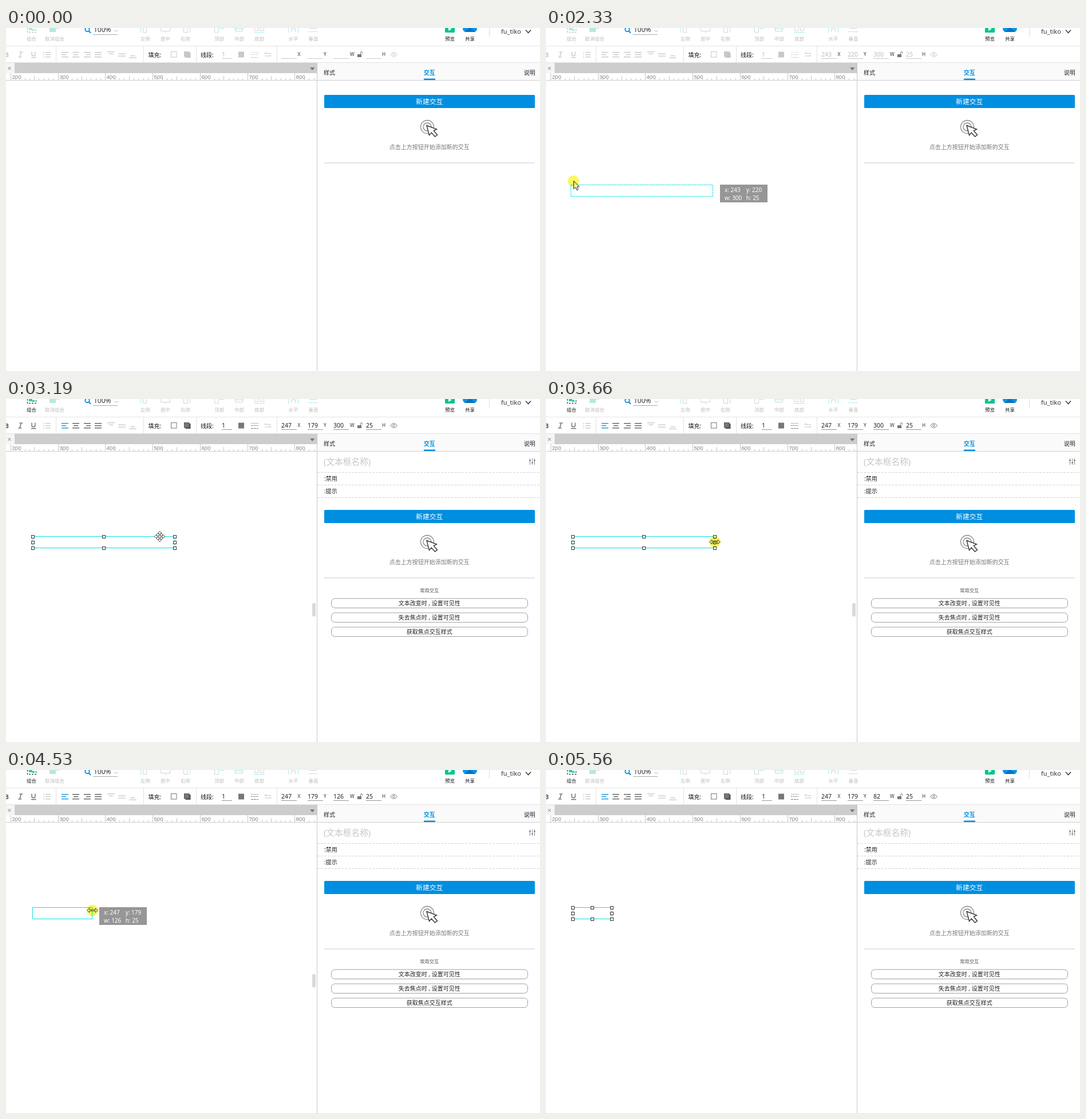
These frames come from a looping animation (933 px wide and 600 px high, 8 s). An HTML page:

```html
<!DOCTYPE html>
<html lang="zh-CN">
<head>
<meta charset="utf-8">
<title>文本框拖放与缩放</title>
<style>
  html, body { margin: 0; width: 100%; height: 100%; overflow: hidden; background: #fff; }
  svg {
    display: block; width: 933px; height: 600px;
    font-family: "Noto Sans", "Noto Sans CJK SC", "Noto Sans CJK", sans-serif;
    --ink: #c4c4c4; --word: #bdbdbd; --accent: #c4c4c4; --rule: #c8c8c8; --teal: #b5e8df; --solid: #c8c8c8;
  }
  svg.sel { --ink: #555; --word: #222; --accent: #008fe0; --rule: #999; --teal: #2cc9b0; --solid: #777; }
  text { white-space: pre; }
</style>
</head>
<body>
<svg id="stage" viewBox="0 0 933 600">
  <g id="bars"></g>
  <g id="panel"></g>
  <g id="work"></g>
</svg>
<script>
const LOOP = 8000, UNIT = 0.828;
const BLUE = '#008fe0', OFF = '#c8c8c8', INK = 'var(--ink)', WORD = 'var(--word)', CYAN = '#0ae0e6';
const $ = id => document.getElementById(id);

// y is the vertical middle of the glyphs
const text = (x, y, s, size = 10, fill = '#222', more = '') =>
  `<text x="${x}" y="${y + size * 0.37}" font-size="${size}" style="fill:${fill}" ${more}>${s}</text>`;
const mid = (x, y, s, size, fill, more = '') => text(x, y, s, size, fill, 'text-anchor="middle" ' + more);
const rect = (x, y, w, h, fill, more = '') =>
  `<rect x="${x}" y="${y}" width="${w}" height="${h}" style="fill:${fill}" ${more}/>`;
const line = (d, stroke, w = 1, more = '') =>
  `<path d="${d}" style="fill:none;stroke:${stroke};stroke-width:${w}" ${more}/>`;
const frame = (x, y, w, h, stroke, fill = 'none', more = '') =>
  `<rect x="${x}" y="${y}" width="${w}" height="${h}" style="fill:${fill};stroke:${stroke}" ${more}/>`;
const rows = (x, y, gap, widths, fill, align = 0) => {
  const full = Math.max(...widths);
  return widths.map((w, i) => rect(x + (full - w) * align, y + i * gap, w, 1.3, fill)).join('');
};

function topRow() {
  const pale = '#a5edf0', gray = '#d4d4d4';
  const labels = [[85, '取消组合'], [243.5, '左侧'], [278.5, '居中'], [313.5, '右侧'], [372.5, '顶部'],
    [407.5, '中部'], [442.5, '底部'], [502, '水平'], [537, '垂直']];
  return [
    line('M37.5 0V7.5H52.5V0', INK, 1.4, 'stroke-dasharray="3 2"'),
    rect(40, 0, 6, 4, 'var(--teal)'), rect(46, 2, 4, 3, 'var(--teal)'),
    rect(76, 0, 11, 7, '#b5e8df'), line('M87 .5H93', gray),
    mid(44.5, 18.5, '组合', 8.5, WORD),
    ...labels.map(([x, s]) => mid(x, 18.5, s, 8.5, '#bdbdbd')),
    '<circle cx="142" cy="2.5" r="3.7" fill="none" stroke="#008fe0" stroke-width="1.8"/>',
    line('M144.7 5.3L148 8.7', BLUE, 2),
    text(153, 2.2, '100%', 12, '#333'), line('M152 11.5H195', '#aaa'), line('M189.5 3.5L192.5 6.5L195.5 3.5', '#aaa'),
    line('M235.5 0V8', pale), line('M239.5 0V7.5H245.5V0', gray),
    line('M270.5 0V5.5H286.5V0', gray), line('M278.5 5V9', pale),
    line('M321.5 0V8', pale), line('M310.5 0V7.5H317.5V0', gray),
    line('M364.5 0V7.5H371.5V0', gray), line('M373 .5H381', pale),
    line('M400.5 0V5.5H413.5V0', gray), line('M399 1.5H415', pale),
    line('M434.5 0V4.5H441V0M444.5 0V4.5H450.5V0', gray), line('M433 7.5H452', pale),
    line('M493.5 0V8M510.5 0V8', pale), line('M498.5 7V1.5H505.5V7', gray),
    line('M528 6.5H545', pale), line('M530.5 .5H543', gray),
    rect(767, -4, 17, 12, '#00c58e', 'rx="1.5"'), '<path d="M773 -1L779 1.5L773 5Z" fill="#fff"/>',
    '<path d="M798 0H823Q823 7 817 7H804Q798 7 798 0Z" fill="#0a94e6"/>',
    '<path d="M801 7L809 0H812L820 7Z" fill="#0672c4"/>',
    mid(775.5, 18.5, '预览', 8.5, '#111'), mid(810.5, 18.5, '共享', 8.5, '#111'),
    line('M844.5 0V15', '#ddd'), text(865, 5.8, 'fu_tiko', 11, '#333'),
    line('M908 3.5L912.5 8.5L917 3.5', '#444', 1.7)
  ].join('');
}

function formatRow() {
  return [
    text(-2.5, 46.5, 'B', 11, INK, 'font-weight="600"'),
    line('M23 42H29.5M21 51H27.5M26.5 42L24 51', INK, 1.2),
    line('M45 41.5V46Q45 49 48 49T51 46V41.5M44 51.7H52.5', INK, 1.2),
    rows(65, 42, 4, [2, 2, 2], OFF), rows(69, 42, 4, [9, 9, 9], OFF),
    rows(97, 42, 4, [12, 8, 12], 'var(--accent)'), rows(116, 42, 4, [12, 8, 12], INK, 0.5),
    rows(136, 42, 4, [12, 8, 12], INK, 1), rows(155, 42, 4, [12, 12, 12], INK),
    rows(177, 41, 3.5, [13, 8], OFF, 0.5), rows(196, 44.5, 4, [13, 13], OFF), rows(215, 48, 3.5, [8, 13], OFF, 0.5),
    line('M87.5 32V60M240.5 32V60M332.5 32V60M473.5 32V60', '#e2e2e2'),
    text(248.5, 47, '填充:', 10, '#111'), text(340, 47, '线段:', 10, '#111'),
    frame(288.5, 41.5, 9.5, 9.5, 'var(--solid)'),
    rect(313.5, 43, 9, 9, INK), frame(311.5, 41.5, 8.5, 8.5, INK, 'var(--solid)'),
    text(377, 46, '1', 10.5, WORD), line('M377 53.5H395', 'var(--rule)'),
    rect(406, 41.5, 10, 10, 'var(--solid)'),
    line('M428 42.5H441', 'var(--solid)', 1, 'stroke-dasharray="1 1"'),
    line('M428 46.5H441', 'var(--solid)', 1, 'stroke-dasharray="2 1"'),
    line('M428 51.5H441', 'var(--solid)', 1, 'stroke-dasharray="4 1"'),
    line('M454.5 41.8L452 44.5H463M460.5 46.5L463 49H452', OFF),
    ...[[481, 'X', 509.5], [527, 'Y', 555], [572, 'W', 601], [629, 'H', 657]].map(([x, s, lx]) =>
      line(`M${x} 53.5h27`, 'var(--rule)') + text(lx, 46.3, s, 8.2, '#333')),
    rect(614, 46, 7, 5, '#777'), line('M619.5 46V43.5Q619.5 41.5 621 41.5T622.7 43.5V45', '#777'),
    line('M671.5 46.5Q677.5 38.5 683.5 46.5Q677.5 54 671.5 46.5Z', 'var(--solid)'),
    '<circle cx="677.5" cy="46.3" r="1.8" style="fill:none;stroke:var(--solid)"/>'
  ].join('');
}

function ruler() {
  let s = '';
  for (let u = 200; u <= 840; u += 10) {
    const x = Math.floor(8.2 + (u - 200) * UNIT) + 0.5;
    const top = u % 100 === 0 ? 79 : u % 50 === 0 ? 84 : 88;
    s += line(`M${x} ${top}V91`, '#c4c4c4');
    if (u % 100 === 0) s += text(x + 2, 85, u, 9.6, '#808080', 'font-family="Liberation Sans, Arial, sans-serif"');
  }
  return s;
}

function bars() {
  return [
    topRow(), line('M0 31.5H933', '#e6e6e6'), formatRow(),
    rect(0, 61, 543, 18, '#cdcdcd'), rect(0, 61, 15, 18, '#f5f5f5'),
    line('M3.5 68L8.5 73M8.5 68L3.5 73', '#777'),
    '<path d="M531 69H539.5L535.2 74Z" fill="#777"/>',
    rect(0, 79, 543, 13, '#fff'), ruler(),
    rect(544, 61, 389, 30, '#fafafa'),
    line('M0 60.5H933', '#e2e2e2'), line('M0 91.5H933', '#cfcfcf'), line('M543.5 61V600', '#c8c8c8'),
    text(555, 78.5, '样式', 10, '#222'), text(904.7, 78.5, '说明', 10, '#222'),
    mid(739.8, 78.5, '交互', 10, BLUE, 'font-weight="700"'), rect(730, 88.5, 20, 2.5, BLUE)
  ].join('');
}

function panel(sel) {
  const main = [
    rect(556, 117, 368, 23, BLUE, 'rx="1.5"'), mid(739.7, 128.5, '新建交互', 11.8, '#fff'),
    '<g fill="none" stroke="#888" stroke-width="1.3"><circle cx="736" cy="173" r="11.5"/><circle cx="736" cy="173" r="7"/></g>',
    '<path d="M735 170.5L739.5 187.5L743.3 183L749.5 190L753.5 187L747.3 179.8L752.5 177Z" fill="#fff" stroke="#333" stroke-width="1.4"/>',
    mid(739.8, 208.5, '点击上方按钮开始添加新的交互', 10, '#777'),
    line('M556 236H924', '#cbcbcb', 1.2)
  ].join('');
  if (!sel) return main;
  const common = ['文本改变时 , 设置可见性', '失去焦点时 , 设置可见性', '获取焦点交互样式'];
  return [
    `<g transform="translate(0 77)">${main}</g>`,
    text(555, 110, '(文本框名称)', 14.7, '#c6c6c6'),
    line('M915.5 104V115M919.5 104V115M923.5 104V115', '#888'),
    line('M914 107.5H917M918 111.5H921M922 107.5H925', '#555'),
    ...[128.5, 150.5, 172.5].map(y => line(`M544 ${y}H933`, '#d4d4d4', 1, 'stroke-dasharray="4 2"')),
    text(556, 139, ':禁用', 10, '#222'), text(556, 161, ':提示', 10, '#222'),
    mid(739.7, 335, '常用交互', 8.4, '#555'),
    ...common.map((s, i) => frame(568.5, 349 + i * 25, 343, 16.5, '#a0a0a0', '#fff', 'rx="6"') +
      mid(739.7, 357.2 + i * 25, s, 10, '#222'))
  ].join('');
}

// Arrow-headed cursors: one arm turned about the centre
function arms(angles) {
  const arm = [[-1, -1], [-1, -5], [-3.8, -5], [0, -9.3], [3.8, -5], [1, -5], [1, -1]];
  const pts = angles.flatMap(a => {
    const c = Math.cos(a * Math.PI / 180), s = Math.sin(a * Math.PI / 180);
    return arm.map(([x, y]) => [(x * c - y * s).toFixed(1), (x * s + y * c).toFixed(1)].join());
  });
  return `<polygon points="${pts.join(' ')}" fill="#fff" stroke="#333" stroke-width=".9"/>`;
}
const cursors = {
  arrow: '<path d="M.5 -.5V13.5L3.7 10.6L6 15.7L8.2 14.7L6 9.8H10.2Z" fill="#fff" stroke="#222"/>',
  move: arms([0, 90, 180, 270]),
  size: arms([90, 270])
};

function pointer({ kind, x, y, press }) {
  const glow = press ? `<circle cx="${x}" cy="${y}" r="10" fill="#fcf664" style="mix-blend-mode:multiply"/>` : '';
  return `<g transform="translate(${x} ${y})">${cursors[kind]}</g>${glow}`;
}

function tip(left, top, b) {
  const row = (y, p, q) => text(left + 8, y, p, 10, '#fff') + text(left + 45.7, y, q, 10, '#fff');
  return rect(left, top, 83, 31, '#969696') +
    row(top + 9.7, `x: ${b.x}`, `y: ${b.y}`) + row(top + 23.7, `w: ${b.w}`, 'h: 25');
}

function widget({ box: b, look, hint }) {
  const x = Math.round(46 + (b.x - 247) * UNIT) + 0.5, y = Math.round(240 + (b.y - 179) * UNIT) + 0.5;
  const w = Math.round(b.w * UNIT), h = 20;
  let s = '';
  if (look === 'ghost') s += frame(x, y, w, h, CYAN, 'none', 'stroke-dasharray="3 1"');
  if (look === 'solid') s += frame(x, y, w, h, CYAN);
  if (look === 'picked') {
    s += line(`M${x} ${y}h${w}m0 ${h}h${-w}`, CYAN);
    s += line(`M${x} ${y}v${h}m${w} 0v${-h}`, CYAN, 1, 'stroke-dasharray="1 1"');
    for (const i of [0, 1, 2]) for (const j of [0, 1, 2]) {
      if (i === 1 && j === 1) continue;
      s += frame(x + Math.round(w * i / 2) - 2, y + h * j / 2 - 2, 5, 5, '#333', '#fff');
    }
  }
  if (hint) s += tip(x + w + 12.5, y - 0.5, b);
  [[481, b.x], [527, b.y], [572, b.w], [629, 25]].forEach(([fx, v]) => { s += text(fx, 46, v, 10.5, WORD); });
  return s;
}

const at = (kind, x, y, press = false) => ({ kind, x, y, press });
const hover = (t, x, y) => [t, { thumb: true, cur: at('arrow', x, y) }];
const drag = (t, x, y) => [t, {
  box: { x, y, w: 300 }, look: 'ghost', hint: true,
  cur: at('arrow', Math.round(51 + (x - 247) * UNIT), Math.round(234 + (y - 179) * UNIT), true)
}];
const pick = (t, cur, w = 300, hint = false, thumb = true) =>
  [t, { sel: true, thumb, box: { x: 247, y: 179, w }, look: 'picked', hint, cur }];
const pull = (t, w, y) => [t, {
  sel: true, thumb: true, box: { x: 247, y: 179, w }, look: 'solid', hint: true,
  cur: at('size', Math.round(46.5 + w * UNIT), y, true)
}];

const steps = [
  [0, {}],
  hover(360, 400, 490), hover(440, 180, 440), hover(520, 17, 395),
  [600, { thumb: true }], [760, {}],
  drag(2330, 243, 220), drag(2400, 231, 203), drag(2480, 220, 187), drag(2550, 215, 179),
  drag(2710, 235, 179), drag(2800, 247, 179),
  pick(3100, at('move', 150, 238)), pick(3190, at('move', 268.5, 240.5)),
  pick(3270, at('arrow', 298, 246)), pick(3350, at('size', 296, 250)), pick(3430, at('size', 295, 250)),
  pick(3660, at('size', 295, 250, true)), pick(3740, at('size', 295, 250, true), 300, true),
  pick(3820, at('size', 296, 250, true), 300, true), pick(3900, at('size', 295, 250, true), 300, true),
  pull(4130, 298, 249), pull(4220, 284, 248), pull(4300, 256, 247), pull(4370, 214, 246), pull(4450, 168, 245.5),
  pull(4530, 126, 245.5), pull(4620, 104, 246), pull(4690, 94, 246), pull(4770, 88, 247), pull(4850, 84, 247),
  pull(5000, 82, 247),
  pick(5320, at('size', 114, 246), 82), pick(5400, at('arrow', 62, 228), 82),
  pick(5480, null, 82), pick(5560, null, 82, false, false)
];

let shown = -1, shownSel = null;
function draw(t) {
  let i = steps.length - 1;
  while (steps[i][0] > t) i--;
  if (i === shown) return;
  shown = i;
  const s = steps[i][1], sel = !!s.sel;
  if (sel !== shownSel) {
    shownSel = sel;
    $('stage').classList.toggle('sel', sel);
    $('panel').innerHTML = panel(sel);
  }
  $('work').innerHTML = (s.thumb ? rect(535, 357, 6, 23.5, '#d9d9d9', 'rx="2.5"') : '') +
    (s.box ? widget(s) : '') + (s.cur ? pointer(s.cur) : '');
}

$('bars').innerHTML = bars();
const start = performance.now();
function tick() {
  draw((performance.now() - start) % LOOP);
  requestAnimationFrame(tick);
}
tick();
</script>
</body>
</html>
```
